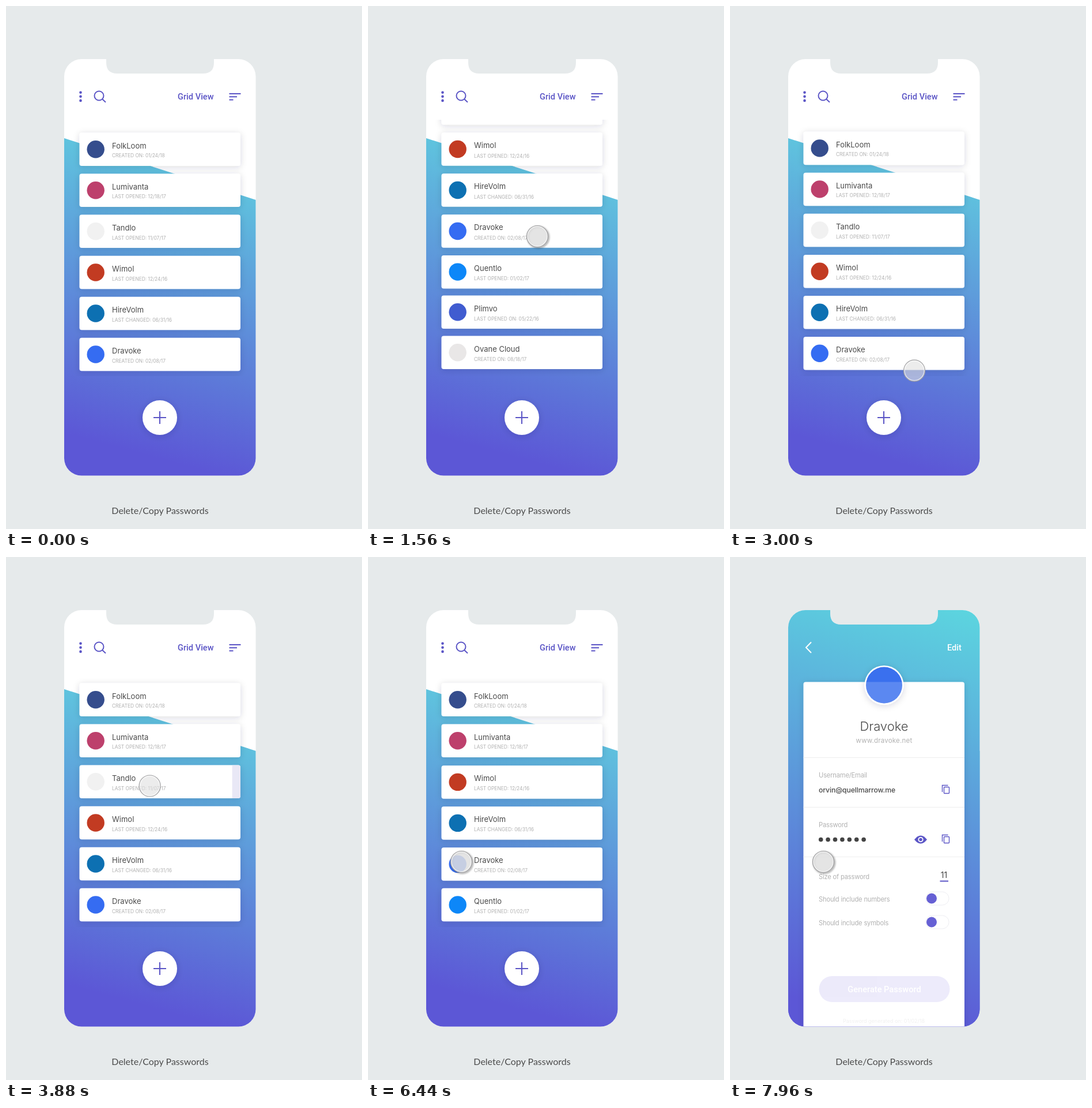
Recreate the animation shown at these times as an HTML page. Size 618 by 906 pixels, loop 8000 ms.

```html
<!DOCTYPE html>
<html lang="en">
<head>
<meta charset="utf-8">
<title>Password list</title>
<style>
  html, body { margin: 0; width: 100%; height: 100%; overflow: hidden; background: #e6eaeb; }
  svg { display: block; width: 618px; height: 906px; font-family: Inter, sans-serif; }
  .name { font-size: 13px; fill: #4a4a4a; }
  .note { font-size: 8.4px; fill: #b0b0b0; }
  .label { font-size: 11.2px; letter-spacing: -.2px; fill: #b2b2b2; }
  .action { font: 500 14.6px Roboto, sans-serif; }
  .line { fill: none; stroke: #5b55c6; stroke-width: 2; }
  .rule { stroke: #eeeeee; }
</style>
</head>
<body>
<svg viewBox="0 0 618 906">
  <defs>
    <linearGradient id="slope" gradientUnits="userSpaceOnUse" x1="101" y1="230" x2="-27" y2="705">
      <stop stop-color="#5fc3de"/><stop offset="1" stop-color="#5c57d6"/>
    </linearGradient>
    <linearGradient id="sheetFill" gradientUnits="userSpaceOnUse" x1="101" y1="0" x2="-90" y2="708">
      <stop stop-color="#5cd6df"/><stop offset="1" stop-color="#5c57d6"/>
    </linearGradient>
    <clipPath id="phone">
      <path d="M131 92H174V98Q174 117 193 117H342Q361 117 361 98V92H403.500A30 30 0 0 1 433.500 122V783.500A30 30 0 0 1 403.500 813.500H131A30 30 0 0 1 101 783.500V122A30 30 0 0 1 131 92Z"/>
    </clipPath>
    <clipPath id="window"><rect x="113" y="197" width="308" height="444"/></clipPath>
    <clipPath id="cardShape"><rect x="127.500" width="279.500" height="57.500" rx="4"/></clipPath>
    <clipPath id="below"><rect x="220" y="216.500" width="100" height="60"/></clipPath>
    <filter id="shade" filterUnits="userSpaceOnUse" x="60" y="-100" width="420" height="1100">
      <feDropShadow dx="0" dy="2" stdDeviation="6" flood-color="#202040" flood-opacity=".16"/>
    </filter>
    <filter id="soft" x="-30%" y="-30%" width="160%" height="160%"><feGaussianBlur stdDeviation="1.5"/></filter>
    <g id="copy" fill="none" stroke="#5b55c6" stroke-width="1.400">
      <path d="M-6 4.500V-7H4"/><rect x="-3" y="-4" width="9" height="11" rx="1"/>
    </g>
    <g id="toggle">
      <rect x="340" y="-11.500" width="40" height="23" rx="11.500" fill="#fff" stroke="#eeeef2"/>
      <circle cx="350" r="9" fill="#6660d4"/>
    </g>
  </defs>

  <rect width="618" height="906" fill="#e6eaeb"/>
  <g clip-path="url(#phone)">
    <rect x="100" y="90" width="335" height="726" fill="#fff"/>
    <path d="M101 229L434 336V814H101Z" fill="url(#slope)"/>
    <g fill="#5b55c6">
      <circle cx="129.500" cy="149.700" r="2.300"/><circle cx="129.500" cy="156.800" r="2.300"/><circle cx="129.500" cy="163.900" r="2.300"/>
      <text x="298" y="161.500" class="action">Grid View</text>
    </g>
    <g class="line">
      <circle cx="161.500" cy="155.500" r="8"/><path d="M167.200 161.200L173 166.800"/>
      <path d="M387.500 152H407.500M387.500 157.200H401M387.500 162.400H394.500"/>
    </g>
    <g clip-path="url(#window)"><g id="list" filter="url(#shade)"></g></g>
    <circle cx="267" cy="713" r="30" fill="#fff" filter="url(#shade)"/>
    <path class="line" d="M256 713H278M267 702V724"/>

    <g id="sheet"><rect x="100" y="92" width="335" height="1000" fill="url(#sheetFill)"/></g>

    <g id="detail">
      <g id="top" fill="#fff">
        <path d="M141 147.500L132 156.800L141 166" fill="none" stroke="#fff" stroke-width="2"/>
        <text x="377" y="161.500" class="action">Edit</text>
      </g>
      <g id="page">
        <rect x="127.500" y="216.500" width="279.500" height="640" rx="4" fill="#fff" filter="url(#shade)"/>
        <circle cx="267.500" cy="222" r="34" fill="#fff" filter="url(#shade)"/>
        <circle cx="267.500" cy="222" r="31.500" fill="#3a70ee"/>
        <circle cx="267.500" cy="222" r="31.500" fill="#fff" opacity=".17" clip-path="url(#below)"/>
        <g text-anchor="middle">
          <text x="267.500" y="301" font-size="22" font-weight="300" fill="#4a4a4a">Dravoke</text>
          <text x="267.500" y="321.500" font-size="11.500" letter-spacing=".2" fill="#b2b2b2">www.dravoke.net</text>
        </g>
        <path class="rule" d="M127.500 347.500H407M127.500 433.500H407M127.500 519.500H407"/>
      </g>
      <g id="fields">
        <text x="154" y="382" class="label">Username/Email</text>
        <text x="154" y="407.500" font-size="12.200" letter-spacing="-.1" font-weight="500" fill="#4a4a4a">orvin@quellmarrow.me</text>
        <use href="#copy" x="374.500" y="402.500"/>
        <text x="154" y="468" class="label">Password</text>
        <g id="dots" fill="#444"></g>
        <path d="M320 489.500Q331 475.500 342 489.500Q331 503.500 320 489.500Z" fill="#5b55c6"/>
        <circle cx="331" cy="489.500" r="3.700" fill="#5b55c6" stroke="#fff" stroke-width="1.800"/>
        <use href="#copy" x="374.500" y="488.500"/>
        <text x="154" y="557.500" class="label">Size of password</text>
        <text x="371.500" y="556" text-anchor="middle" font-size="14" fill="#444">11</text>
        <path class="line" d="M364.500 561.500H379"/>
        <text x="154" y="597" class="label">Should include numbers</text>
        <use href="#toggle" y="591.500"/>
        <text x="154" y="637.500" class="label">Should include symbols</text>
        <use href="#toggle" y="632.500"/>
      </g>
      <g id="footer" text-anchor="middle">
        <rect x="154.500" y="726" width="227" height="45" rx="22.500" fill="#6658d8"/>
        <text x="268" y="754" class="action" fill="#fff">Generate Password</text>
        <text x="267" y="807" font-size="9" fill="#888">Password generated on: 01/02/18</text>
      </g>
    </g>

    <g id="cursor">
      <circle id="cursorShade" cx="1.500" cy="1.500" r="18" fill="none" stroke="#333" stroke-width="3" filter="url(#soft)"/>
      <circle id="cursorFill" r="18.500" fill="#e0e0e0"/>
      <circle r="17" fill="none" stroke="#fff" stroke-opacity=".6" stroke-width="1.500"/>
      <circle r="18.500" fill="none" stroke="#a0a0a2" stroke-width="1.200"/>
    </g>
  </g>
  <text x="267.500" y="879.500" text-anchor="middle" font-family="Lato, sans-serif" font-size="16" fill="#4c4c4c">Delete/Copy Passwords</text>
</svg>

<script>
const LOOP = 8000, REMOVED = 2;
const $ = id => document.getElementById(id);

const cards = [
  [219.5, '#344e8d', 'FolkLoom', 'CREATED ON: 01/24/18'],
  [290.5, '#bd3f6c', 'Lumivanta', 'LAST OPENED: 12/18/17'],
  [361.5, '#f1f1f1', 'Tandlo', 'LAST OPENED: 11/07/17'],
  [432.8, '#c23a24', 'Wimol', 'LAST OPENED: 12/24/16'],
  [503.8, '#0a6fb2', 'HireVolm', 'LAST CHANGED: 06/31/16'],
  [574.8, '#346cf2', 'Dravoke', 'CREATED ON: 02/08/17'],
  [645.4, '#0a87f8', 'Quentlo', 'LAST OPENED: 01/02/17'],
  [715, '#3f5bd0', 'Plimvo', 'LAST OPENED ON: 05/22/16'],
  [785, '#e9e7e7', 'Ovane Cloud', 'CREATED ON: 08/18/17']
];

$('list').innerHTML = cards.map(([, color, name, note], i) => `<g>
  <rect x="127.5" width="279.5" height="57.5" rx="4" fill="#fff"/>
  <circle cx="155.7" cy="28.7" r="15.2" fill="${color}"/>
  <text x="184" y="27" class="name">${name}</text>
  <text x="184" y="${i < 2 ? 42.7 : 43.3}" class="note">${note}</text>
  ${i === REMOVED ? '<g clip-path="url(#cardShape)"><rect id="swipe" height="57.5" fill="#e9e8f6"/></g>' : ''}
</g>`).join('');
const rows = [...$('list').children];

$('dots').innerHTML = Array.from({ length: 7 }, (_, i) =>
  `<circle cx="${157.7 + i * 12.4}" cy="489.5" r="3.8"/>`).join('');

const clamp = v => Math.min(1, Math.max(0, v));
const ramp = (t, from, to) => clamp((t - from) / (to - from));
const inOut = p => p < .5 ? 4 * p ** 3 : 1 - 4 * (1 - p) ** 3;
const out = p => 1 - (1 - p) ** 3;

// Eased value through [time, value] keys.
function track(t, keys) {
  const i = keys.findIndex(k => k[0] > t);
  if (i < 0) return keys[keys.length - 1][1];
  if (i === 0) return keys[0][1];
  const [a, b] = [keys[i - 1], keys[i]];
  return a[1] + (b[1] - a[1]) * inOut(ramp(t, a[0], b[0]));
}

const scrollKeys = [[500, 0], [1250, -213.5], [2400, -213.5], [3067, -1]];
const xKeys = [[500, 290], [1250, 294], [1600, 294], [2300, 320], [3067, 320], [3600, 264],
  [3732, 264], [4212, 144], [4400, 144], [4900, 374], [5700, 374], [6450, 162]];
const yKeys = [[500, 612], [1250, 398.5], [1600, 399], [2300, 420], [2400, 420], [3067, 632.5],
  [3600, 396.5], [4400, 396.5], [4900, 400], [5700, 400], [6450, 528]];
const presses = [[400, 1300], [2320, 3090], [3640, 4240], [4950, 5100], [6600, 6760]];

const move = (el, x, y) => el.setAttribute('transform', `translate(${x} ${y})`);
const fade = (el, v) => el.setAttribute('opacity', v);

function draw(t) {
  const scroll = track(t, scrollKeys);
  const lift = 70.6 * inOut(ramp(t, 5221, 5721));
  rows.forEach((row, i) => move(row, 0, cards[i][0] + scroll - (i > REMOVED ? lift : 0)));
  fade(rows[REMOVED], 1 - ramp(t, 5100, 5300));

  const width = 120 * inOut(ramp(t, 3732, 4212));
  $('swipe').setAttribute('x', 407 - width);
  $('swipe').setAttribute('width', width);

  move($('sheet'), 0, 722 * (1 - out(ramp(t, 6962, 7700))));
  fade($('sheet'), ramp(t, 6962, 7495));

  const show = ramp(t, 7480, 7800);
  fade($('top'), show);
  fade($('page'), show);
  move($('page'), 0, 40 * (1 - out(ramp(t, 7480, 7880))));
  fade($('fields'), ramp(t, 7640, 7940));
  fade($('footer'), ramp(t, 7915, 8300));

  const press = Math.max(...presses.map(([a, b]) => ramp(t, a, a + 80) * (1 - ramp(t, b, b + 90))));
  move($('cursor'), track(t, xKeys), track(t, yKeys));
  fade($('cursor'), ramp(t, 100, 350));
  fade($('cursorShade'), .45 * (1 - press));
  fade($('cursorFill'), .85 - .25 * press);
}

const start = performance.now();
function tick() {
  draw((performance.now() - start) % LOOP);
  requestAnimationFrame(tick);
}
tick();
</script>
</body>
</html>
```
